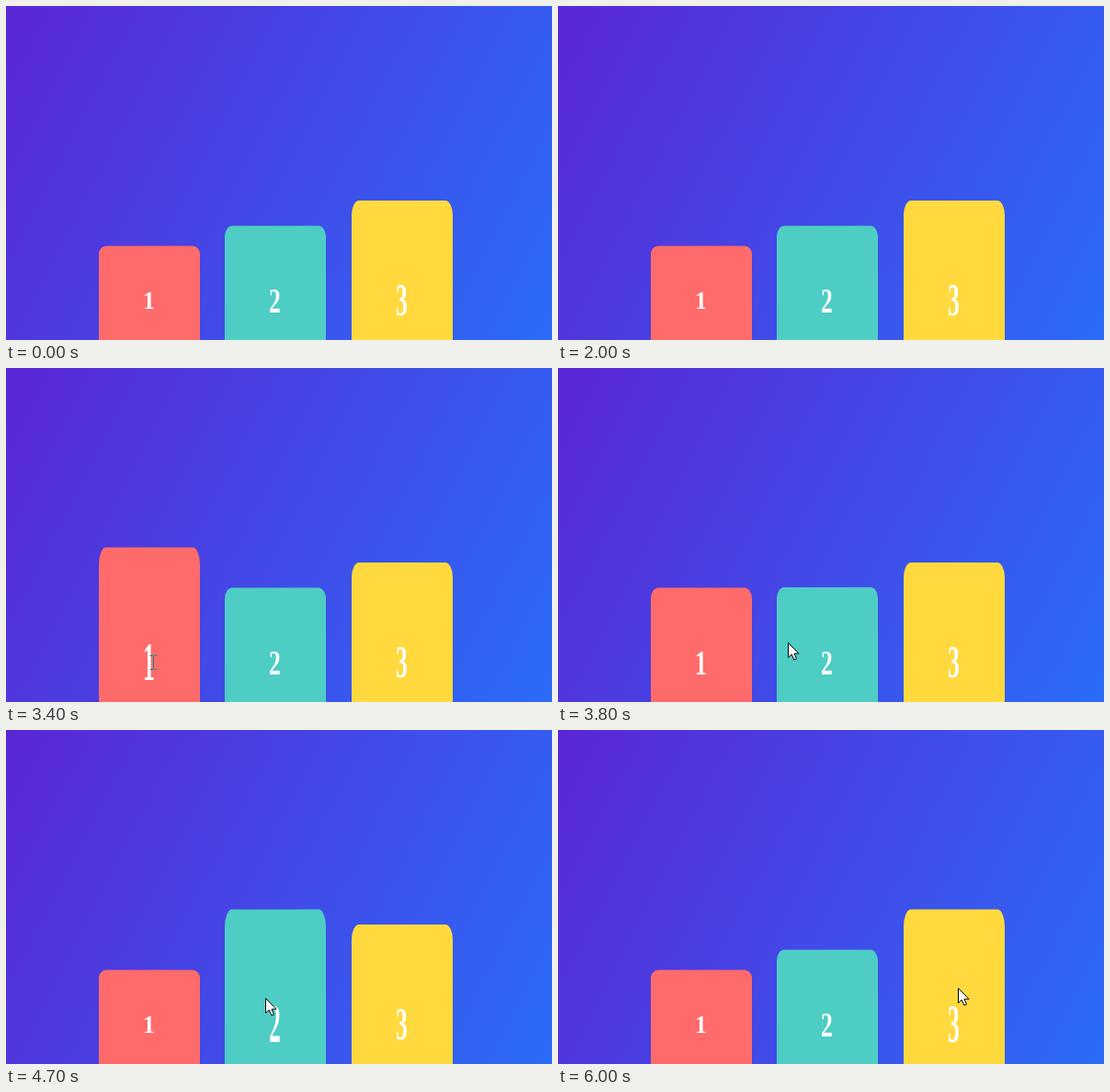
Write an HTML page with a canvas that moves like this. It is 594 px wide and 364 px high and loops after 6.1 s.

```html
<!DOCTYPE html>
<html lang="en">
<head>
<meta charset="utf-8">
<title>Growing bars</title>
<style>
  html, body { margin: 0; width: 100%; height: 100%; overflow: hidden; }
  body { background: #4449e4; }
  canvas { display: block; }
</style>
</head>
<body>
<canvas id="stage" width="594" height="364"></canvas>
<script>
const ctx = document.getElementById('stage').getContext('2d');
const LOOP = 6100, STEP = 100, GROW = 500;
const SIZE = 110, MID_Y = 322, HOVER = 2.3;

const bars = [
  { x: 156, color: '#ff6b6b', scale: 1.1, enter: 2295, leave: 3605 },
  { x: 293, color: '#4ecdc4', scale: 1.5, enter: 3790, leave: 4895 },
  { x: 431, color: '#ffd93d', scale: 2, enter: 4963, leave: Infinity }
];

// Pointer stops; it glides smoothly from each one to the next
const stops = [
  { t: 2300, x: 98, y: 348 },
  { t: 2500, x: 161, y: 314 },
  { t: 3300, x: 154, y: 322 },
  { t: 4040, x: 282, y: 292 },
  { t: 4700, x: 282, y: 292 },
  { t: 5100, x: 407, y: 287 },
  { t: 6000, x: 435, y: 281 }
];

// CSS "ease": cubic-bezier(.25, .1, .25, 1)
function ease(p) {
  if (p <= 0) return 0;
  if (p >= 1) return 1;
  const curve = (u, a, b) => 3 * u * (1 - u) ** 2 * a + 3 * u * u * (1 - u) * b + u ** 3;
  let lo = 0, hi = 1;
  for (let i = 0; i < 20; i++) {
    const u = (lo + hi) / 2;
    if (curve(u, .25, .25) < p) lo = u; else hi = u;
  }
  return curve(lo, .1, 1);
}

function barScale(bar, t) {
  const amount = ease((t - bar.enter) / GROW) - ease((t - bar.leave) / GROW);
  return bar.scale + (HOVER - bar.scale) * amount;
}

function pointerAt(t) {
  const i = stops.findLastIndex(s => s.t <= t);
  if (i < 0) return null;
  const a = stops[i], b = stops[i + 1];
  if (!b) return a;
  const u = (t - a.t) / (b.t - a.t), k = u * u * (3 - 2 * u);
  return { x: Math.round(a.x + (b.x - a.x) * k), y: Math.round(a.y + (b.y - a.y) * k) };
}

function drawBackground() {
  const angle = 27 * Math.PI / 180;
  const cos = Math.cos(angle), sin = Math.sin(angle);
  const half = (594 * cos + 364 * sin) / 2;
  const dx = half * cos, dy = half * sin;
  const fill = ctx.createLinearGradient(297 - dx, 182 - dy, 297 + dx, 182 + dy);
  fill.addColorStop(0, '#5b26d5');
  fill.addColorStop(1, '#2a6cf8');
  ctx.fillStyle = fill;
  ctx.fillRect(0, 0, 594, 364);
}

function drawBar(bar, label, t) {
  ctx.save();
  ctx.translate(bar.x, MID_Y);
  ctx.scale(1, barScale(bar, t));
  ctx.fillStyle = bar.color;
  ctx.beginPath();
  ctx.roundRect(-SIZE / 2, -SIZE / 2, SIZE, SIZE, 8);
  ctx.fill();
  ctx.fillStyle = '#fff';
  ctx.font = 'bold 25.6px "Liberation Serif", "Times New Roman", serif';
  ctx.textAlign = 'center';
  ctx.fillText(label, -.6, 7.7);
  ctx.restore();
}

function drawArrow() {
  ctx.translate(.5, .5);
  ctx.fillStyle = '#fff';
  ctx.strokeStyle = '#000';
  const shape = new Path2D('M0 0V16L3.7 12.6 6.4 18.6 9 17.5 6.5 11.7H11.5Z');
  ctx.fill(shape);
  ctx.stroke(shape);
}

function drawBeam() {
  ctx.globalCompositeOperation = 'difference';
  ctx.fillStyle = '#fff';
  ctx.fillRect(0, -7, 1, 14);
  for (const y of [-8, 7]) {
    ctx.fillRect(-3, y, 3, 1);
    ctx.fillRect(1, y, 3, 1);
  }
}

function drawPointer(t) {
  const p = pointerAt(t);
  if (!p) return;
  const overText = bars.some(bar =>
    Math.abs(p.x - bar.x) < 6.4 && Math.abs(p.y - MID_Y) < 14.7 * barScale(bar, t));
  ctx.save();
  ctx.translate(p.x, p.y);
  if (overText) drawBeam(); else drawArrow();
  ctx.restore();
}

function frame(now) {
  const t = Math.floor(now % LOOP / STEP) * STEP;
  drawBackground();
  bars.forEach((bar, i) => drawBar(bar, i + 1, t));
  drawPointer(t);
  requestAnimationFrame(frame);
}
requestAnimationFrame(frame);
</script>
</body>
</html>
```
